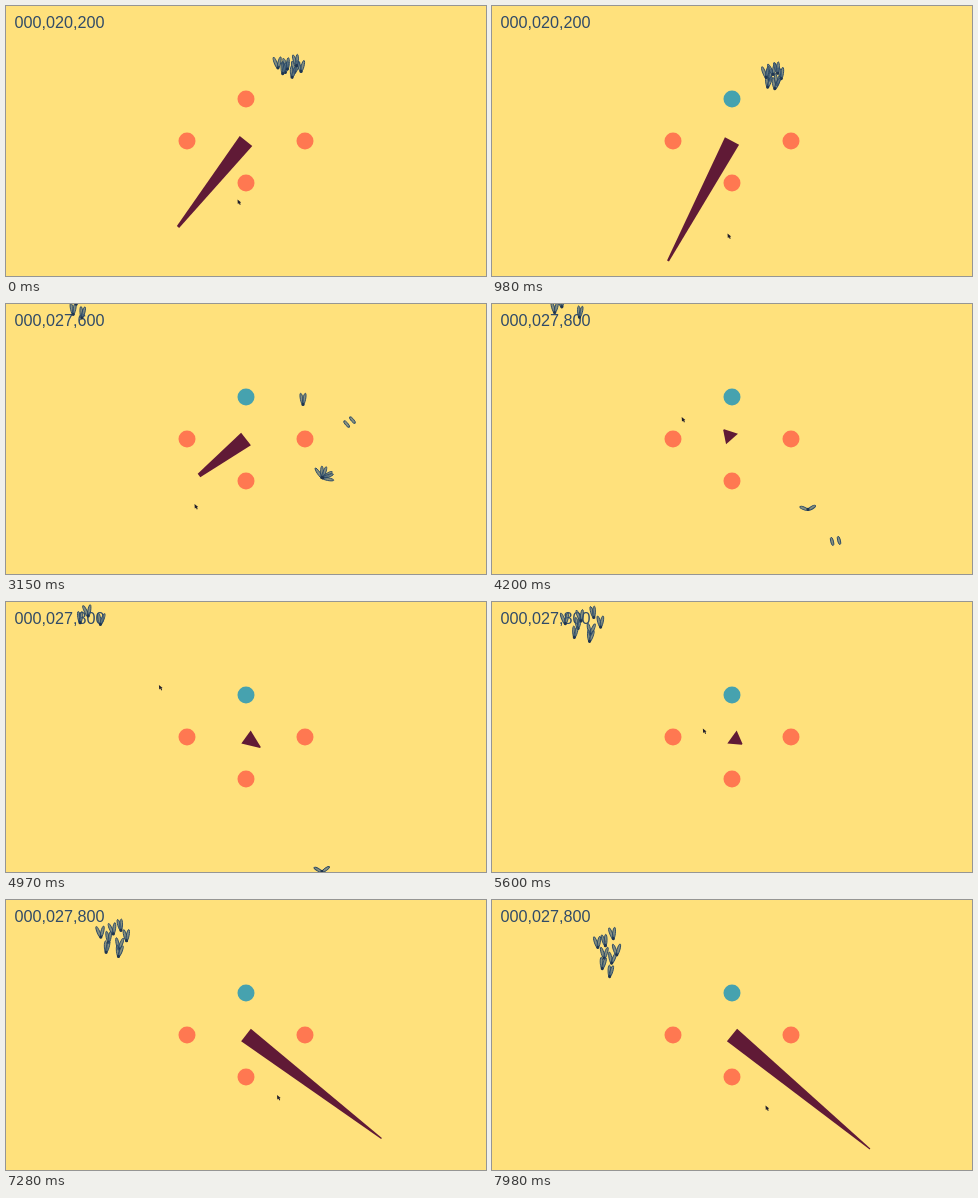
Animation of 480 by 270 pixels, one loop 8000 ms. Source, as an HTML page with a canvas:

```html
<!DOCTYPE html>
<html lang="en">
<head>
<meta charset="utf-8">
<title>Sling swarm</title>
<style>
html, body { margin: 0; width: 100%; height: 100%; overflow: hidden; background: #ffe17c; }
canvas { display: block; width: 480px; height: 270px; }
</style>
</head>
<body>
<canvas id="stage" width="480" height="270"></canvas>
<script>
const ctx = document.getElementById('stage').getContext('2d');
const LOOP = 8000, STEP = 70;
const COUNT = 8, FREE = 3;
const RELEASE = 2420, FALL = 3150;
const ORANGE = '#ff7851', TEAL = '#46a2af', NAVY = '#1f3550';

// Pointer path: time, x, y
const POINTER = [
  [-900, 300, 108], [0, 232, 194], [800, 236, 228], [2380, 236, 228],
  [2640, 236, 164], [3150, 189, 200.5], [4130, 192, 115], [4760, 139, 73],
  [5530, 218, 130], [5930, 136, 92], [6580, 269, 185], [7980, 274, 206]
];
// Press and release times
const PULLS = [[-900, 2380], [2640, 4130], [4760, 5530], [5930, LOOP]];
// Swarm: time, centre x and y, radius x and y
const SWARM = [
  [0, 283, 66, 15, 6], [1960, 279, 85, 7, 14], [RELEASE, 279, 85, 7, 14],
  [FALL, 71, 10, 18, 18], [4200, 73, 10, 45, 10], [5600, 91, 28, 24, 14],
  [6580, 100, 30, 26, 9], [7980, 115, 58, 12, 22]
];
// Where struck bugs are thrown, and how they drop from there
const STRUCK = [
  { x: 316, y: 174, drop: 29, turn: -0.3 },
  { x: 344, y: 118, drop: 108, turn: -0.6, gap: 3.5 },
  { x: 297, y: 101, drop: 180, turn: 0 },
  { x: 316, y: 174, drop: 120, turn: 0.7 },
  { x: 316, y: 174, drop: 120, turn: 1.5 }
];

const clamp = (v, a = 0, b = 1) => Math.min(b, Math.max(a, v));
const mix = (a, b, u) => a + (b - a) * u;
const smooth = u => u * u * (3 - 2 * u);

// Eased values of a key list at time t
function along(keys, t) {
  let i = 0;
  while (i < keys.length - 2 && keys[i + 1][0] <= t) i++;
  const [a, b] = [keys[i], keys[i + 1]];
  const u = smooth(clamp((t - a[0]) / (b[0] - a[0])));
  return a.slice(1).map((v, k) => mix(v, b[k + 1], u));
}

// Each bug keeps its own slot on a golden-angle spiral
function swarmSlot(i, t) {
  const [x, y, rx, ry] = along(SWARM, t);
  const r = Math.sqrt((i + 0.5) / COUNT), a = Math.PI - i * 2.4;
  return [
    x + rx * r * Math.cos(a) + Math.sin(t / 210 + i * 2),
    y + ry * r * Math.sin(a) + Math.cos(t / 260 + i * 3)
  ];
}

function bugPose(i, t) {
  const [x, y] = swarmSlot(i, t);
  const pose = { x, y, turn: 0.15 * Math.sin(i * 2.4), flap: 0.24 + 0.08 * Math.sin(t / 90 + i * 1.7), gap: 0 };
  if (i < FREE || t < RELEASE) return pose;

  const hit = STRUCK[i - FREE];
  const [x0, y0] = swarmSlot(i, RELEASE);
  const thrown = 1 - (1 - clamp((t - RELEASE) / (FALL - RELEASE))) ** 2;
  const time = Math.max(0, t - FALL) / 1000;
  const fallY = mix(y0, hit.y, thrown) + hit.drop * time * time;
  if (fallY < 285) {
    return {
      x: mix(x0, hit.x, thrown), y: fallY, gap: hit.gap || 0,
      turn: hit.turn * thrown / (1 + 3 * time),
      flap: pose.flap + clamp(time) * 0.8
    };
  }
  // Back in from the top edge
  pose.y -= 60 * (1 - smooth(clamp((t - 4600) / 800)));
  return pose;
}

function disc(x, y, r, color) {
  ctx.fillStyle = color;
  ctx.beginPath();
  ctx.arc(x, y, r, 0, Math.PI * 2);
  ctx.fill();
}

function polygon(points, color) {
  ctx.fillStyle = color;
  ctx.beginPath();
  points.forEach(([x, y]) => ctx.lineTo(x, y));
  ctx.closePath();
  ctx.fill();
}

function wing(x, y, angle, length) {
  ctx.save();
  ctx.translate(x, y);
  ctx.rotate(angle);
  ctx.beginPath();
  ctx.ellipse(0, -length, 1.4, length, 0, 0, Math.PI * 2);
  ctx.fill();
  ctx.stroke();
  ctx.restore();
}

function drawBug({ x, y, turn, flap, gap }) {
  ctx.save();
  ctx.translate(x, y);
  ctx.rotate(turn);
  ctx.fillStyle = 'rgba(82,108,128,0.7)';
  ctx.strokeStyle = '#2c4a66';
  ctx.lineWidth = 0.9;
  for (const side of [-1, 1]) {
    if (gap) wing(side * gap, 4, -0.1, 4.2);
    else wing(0, 0, side * flap, mix(6, 4, clamp(flap - 0.3)));
  }
  if (!gap) disc(0, -0.6, 1.6, NAVY);
  ctx.restore();
}

function drawSling(t) {
  const [from, to] = PULLS.filter(p => p[0] <= t).pop();
  const held = t < to;
  const [px, py] = along(POINTER, from);
  const [mx, my] = along(POINTER, Math.min(t, to));
  const pull = Math.hypot(mx - px, my - py);
  const length = held ? Math.max(12.5, pull) : 12.5;
  const end = length < 20 ? 0.6 : Math.max(0.5, 2.9 - length / 75);
  ctx.save();
  ctx.translate(240, 135);
  ctx.rotate(Math.atan2(my - py, mx - px));
  polygon([[0, -8], [length, -end], [length, end], [0, 8]], '#601a36');
  ctx.restore();
}

function drawPointer(t) {
  const [x, y] = along(POINTER, t);
  ctx.save();
  ctx.translate(x, y);
  polygon([[-0.5, -0.5], [-0.2, 4], [1, 3.2], [1.8, 5], [2.7, 4.5], [2, 2.8], [3.2, 2.5]], '#211f2b');
  ctx.restore();
}

function drawScore(t) {
  const hits = Math.round(37 * clamp((t - 2450) / 400)) + (t >= 3710 ? 1 : 0);
  const digits = String(20200 + 200 * hits).padStart(9, '0');
  ctx.fillStyle = '#314b68';
  ctx.font = '16.2px "Liberation Sans", Arial, sans-serif';
  ctx.fillText(digits.replace(/(\d{3})(?=\d)/g, '$1,'), 8.5, 21.5);
}

function draw(t) {
  ctx.fillStyle = '#ffe17c';
  ctx.fillRect(0, 0, 480, 270);
  for (let k = 0; k < 4; k++) {
    const a = k * Math.PI / 2;
    const color = k === 0 && t >= 980 ? TEAL : ORANGE;
    disc(240 + 59 * Math.sin(a), 135 - 42 * Math.cos(a), 8.5, color);
  }
  drawSling(t);
  drawScore(t);
  for (let i = 0; i < COUNT; i++) drawBug(bugPose(i, t));
  drawPointer(t);
}

const begun = performance.now();
function frame() {
  const t = (performance.now() - begun) % LOOP;
  draw(Math.floor(t / STEP) * STEP);
  requestAnimationFrame(frame);
}
frame();
</script>
</body>
</html>
```
